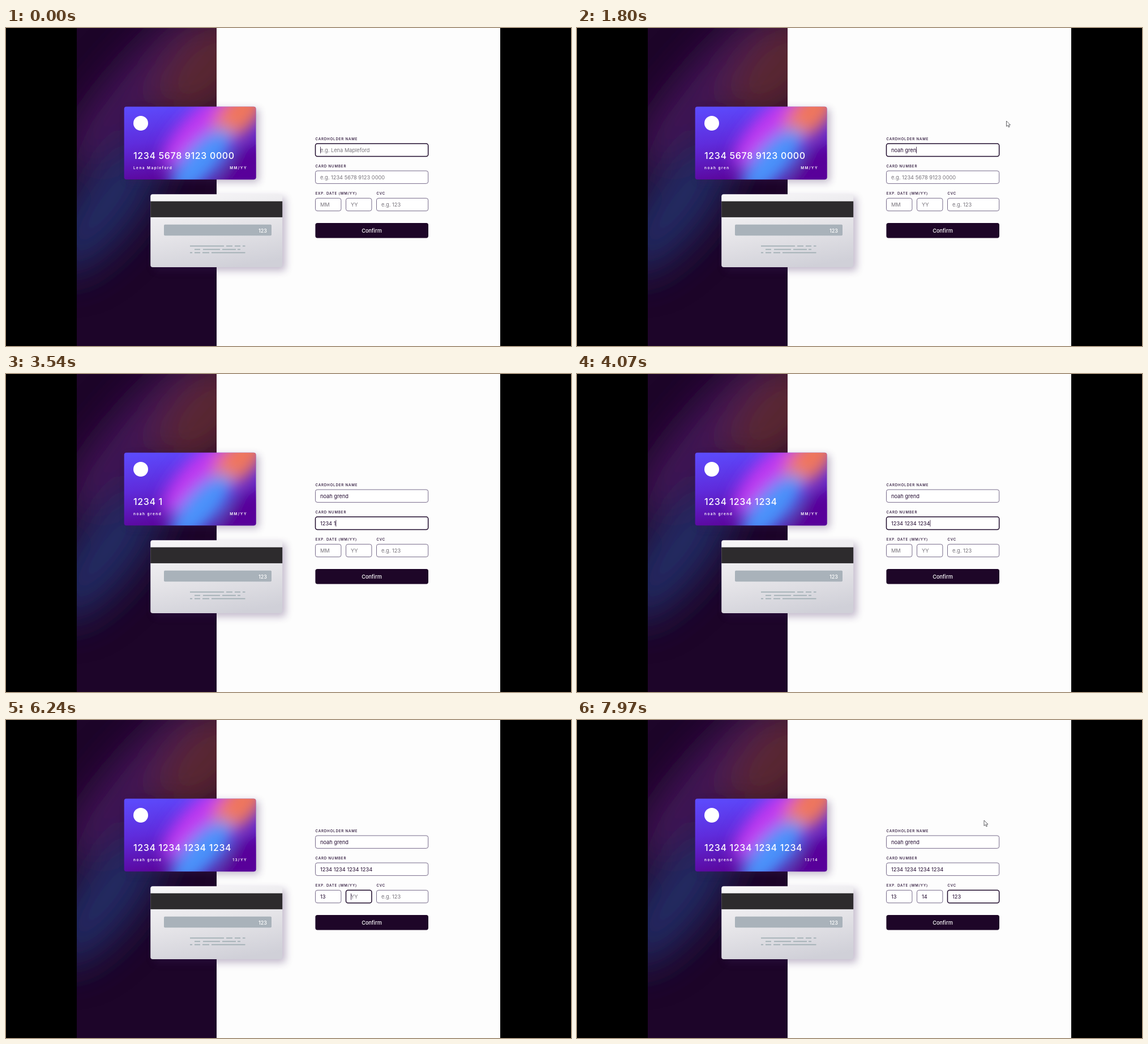
An HTML page that plays this animation: 998x561 px, repeating every 8000 ms.

```html
<!DOCTYPE html>
<html lang="en">
<head>
<meta charset="utf-8">
<title>Card details form</title>
<style>
  html, body { margin: 0; width: 100%; height: 100%; overflow: hidden; background: #000; }
  svg { display: block; width: 100vw; height: 100vh; }
  text { font-family: Inter, "Noto Sans", sans-serif; white-space: pre; }
  .label { font-size: 6.2px; font-weight: 500; letter-spacing: .83px; fill: #21092f; }
  .value { font-size: 9.25px; }
  .number { font-size: 16px; font-weight: 500; letter-spacing: .65px; fill: #fff; }
  .small { font-size: 6.4px; font-weight: 600; letter-spacing: 1.5px; fill: #fff; }
  .bold { font-weight: 500; fill: #fff; }
</style>
</head>
<body>
<svg viewBox="0 0 998 561" preserveAspectRatio="none">
  <defs>
    <clipPath id="panelClip"><rect x="125" width="247" height="561"/></clipPath>
    <clipPath id="frontClip"><rect x="208.7" y="138.7" width="232.8" height="128.6" rx="4"/></clipPath>
    <clipPath id="backClip"><rect x="255.2" y="293.3" width="233" height="128.8" rx="4"/></clipPath>
    <filter id="soft" x="-60%" y="-60%" width="220%" height="220%"><feGaussianBlur stdDeviation="14"/></filter>
    <filter id="wide" x="-80%" y="-80%" width="260%" height="260%"><feGaussianBlur stdDeviation="34"/></filter>
    <filter id="shade" x="-20%" y="-20%" width="140%" height="150%"><feGaussianBlur stdDeviation="7"/></filter>
    <linearGradient id="frontBase" x1="0" y1="0" x2=".25" y2="1">
      <stop offset="0" stop-color="#5c4dff"/>
      <stop offset=".5" stop-color="#5f2cdc"/>
      <stop offset="1" stop-color="#5b069c"/>
    </linearGradient>
    <linearGradient id="backBase" x1=".3" y1="0" x2=".6" y2="1">
      <stop offset="0" stop-color="#f6f5f7"/>
      <stop offset=".5" stop-color="#e5e4e8"/>
      <stop offset="1" stop-color="#d0d0d8"/>
    </linearGradient>
  </defs>

  <rect width="998" height="561"/>
  <rect x="125" width="748" height="561" fill="#fdfdfd"/>

  <g clip-path="url(#panelClip)">
    <rect x="125" width="247" height="561" fill="#1d0529"/>
    <g filter="url(#wide)">
      <ellipse cx="232" cy="105" rx="185" ry="45" transform="rotate(-48 232 105)" fill="#44145a"/>
      <ellipse cx="355" cy="72" rx="115" ry="66" transform="rotate(-48 355 72)" fill="#5a2630"/>
      <ellipse cx="178" cy="312" rx="150" ry="58" transform="rotate(-52 178 312)" fill="#232b63"/>
    </g>
  </g>

  <g filter="url(#shade)" fill="#3a1d5a" opacity=".3">
    <rect x="214" y="143" width="233" height="129" rx="4"/>
    <rect x="261" y="299" width="233" height="129" rx="4"/>
  </g>

  <g clip-path="url(#frontClip)">
    <rect x="208" y="138" width="234" height="130" fill="url(#frontBase)"/>
    <g filter="url(#soft)">
      <ellipse cx="425" cy="262" rx="62" ry="38" transform="rotate(-48 425 262)" fill="#59009a"/>
      <ellipse cx="333" cy="180" rx="82" ry="25" transform="rotate(-48 333 180)" fill="#c238f0"/>
      <ellipse cx="412" cy="150" rx="62" ry="31" transform="rotate(-48 412 150)" fill="#f0775c"/>
      <ellipse cx="344" cy="236" rx="76" ry="30" transform="rotate(-48 344 236)" fill="#4a93fa"/>
    </g>
  </g>
  <circle cx="238" cy="168" r="13" fill="#fff"/>
  <text id="cardNumber" class="number" x="225" y="231"></text>
  <text id="cardName" class="small" x="225" y="248.5"></text>
  <text id="cardDate" class="small" x="426" y="248.5" text-anchor="end"></text>

  <g clip-path="url(#backClip)">
    <rect x="255" y="293" width="234" height="130" fill="url(#backBase)"/>
    <rect x="255" y="305.7" width="234" height="28.2" fill="#2d2b2d"/>
  </g>
  <rect x="279" y="346.7" width="190" height="19.6" rx="1.8" fill="#a9b2ba"/>
  <path stroke="#a0aeb3" stroke-width="1.9" d="M325 384.6h60m4 0h11m4 0h10m4 0h4.5M333 390.6h10m5 0h30m4 0h24m3 0h5M325 396.4h4m4 0h10m4 0h12m4 0h59.5"/>
  <text id="cardCvc" class="bold" x="461" y="360.5" font-size="9" text-anchor="end"></text>

  <g class="label">
    <text x="546.5" y="197.5">CARDHOLDER NAME</text>
    <text x="546.5" y="245.6">CARD NUMBER</text>
    <text x="546.5" y="293.8">EXP. DATE (MM/YY)</text>
    <text x="654.5" y="293.8">CVC</text>
  </g>
  <g id="form"></g>
  <rect id="caret" width=".8" height="11.5" fill="#21092f"/>

  <rect x="546.4" y="344" width="199.6" height="26.4" rx="3.6" fill="#1e0628"/>
  <text class="value bold" x="646" y="360.5" text-anchor="middle">Confirm</text>

  <path id="pointer" d="M0 0V9.6L2.3 7.6L3.9 11L5.5 10.3L4 7H7Z" fill="#fff" stroke="#3c3c40" stroke-width=".8" stroke-linejoin="round"/>
</svg>
<script>
const LOOP = 8000, BLINK = 500;
const NAME = "noah grend", SAMPLE = "Lena Mapleford";
const $ = id => document.getElementById(id);

function make(tag, attrs, parent) {
  const el = document.createElementNS("http://www.w3.org/2000/svg", tag);
  for (const key in attrs) el.setAttribute(key, attrs[key]);
  return parent.appendChild(el);
}

function field(x, y, width, hint) {
  const box = make("rect", { x, y, width, height: 22.4, rx: 3.5, fill: "#fff" }, $("form"));
  const text = make("text", { class: "value", x: x + 8.5, y: y + 14.9 }, $("form"));
  return { x, y, hint, box, text };
}

const fields = {
  name: field(546.5, 204, 199.2, "e.g. " + SAMPLE),
  number: field(546.5, 252, 199.2, "e.g. 1234 5678 9123 0000"),
  month: field(546.5, 300.3, 45.4, "MM"),
  year: field(600.5, 300.3, 45.4, "YY"),
  cvc: field(654.5, 300.3, 91.2, "e.g. 123")
};

// Each event: time, field, and the new value (omitted when only focus moves)
const events = [[-60, "name"]];
const type = (id, full, times, first = 1) =>
  times.forEach((at, i) => events.push([at, id, full.slice(0, first + i)]));

type("name", NAME, [670, 840, 1040, 1140, 1270, 1370, 1640, 1800, 2140], 2);
events.push([2270, "number"]);
[[2840, 2900, 2970, 3200], [3500, 3560, 3620, 3670], [3940, 3980, 4030, 4070], [4400, 4430, 4470, 4500]]
  .forEach((times, g) => type("number", "1234 1234 1234 1234", times, g * 5 + 1));
events.push([5100, "month"]);
type("month", "13", [5900, 6070]);
events.push([6240, "year"]);
type("year", "14", [6540, 6800]);
events.push([7000, "cvc"]);
type("cvc", "123", [7340, 7400, 7470]);

function setText(el, text) {
  if (el.textContent !== text) el.textContent = text;
}

function drawPointer(t) {
  const back = t >= 7870;
  const k = Math.min(1, Math.max(0, (t - 7870) / 100));
  const x = back ? 744 - 25 * k : 758.5;
  const y = back ? 165.5 + 11.5 * k : 164;
  $("pointer").setAttribute("transform", `translate(${x} ${y})`);
  $("pointer").style.display = back || (t >= 120 && t < 2140) ? "" : "none";
}

function draw(t) {
  const values = { name: "", number: "", month: "", year: "", cvc: "" };
  let focus, last;
  for (const [at, id, value] of events) {
    if (at > t) break;
    focus = id;
    last = at;
    if (value !== undefined) values[id] = value;
  }

  for (const id in fields) {
    const f = fields[id], on = id === focus;
    f.box.setAttribute("stroke", on ? "#1f0b2c" : "#685b7d");
    f.box.setAttribute("stroke-width", on ? 1.5 : .9);
    f.text.setAttribute("fill", values[id] ? "#21092f" : "#77737b");
    setText(f.text, values[id] || f.hint);
  }

  setText($("cardName"), values.name || SAMPLE);
  setText($("cardNumber"), values.number || "1234 5678 9123 0000");
  setText($("cardDate"), (values.month || "MM") + "/" + (values.year || "YY"));
  setText($("cardCvc"), values.cvc || "123");

  const f = fields[focus];
  const width = values[focus] ? f.text.getComputedTextLength() : 0;
  $("caret").setAttribute("x", f.x + 8.5 + width);
  $("caret").setAttribute("y", f.y + 5.6);
  $("caret").style.display = (t - last) % (2 * BLINK) < BLINK ? "" : "none";

  drawPointer(t);
}

function tick() {
  draw(performance.now() % LOOP);
  requestAnimationFrame(tick);
}
tick();
</script>
</body>
</html>
```
